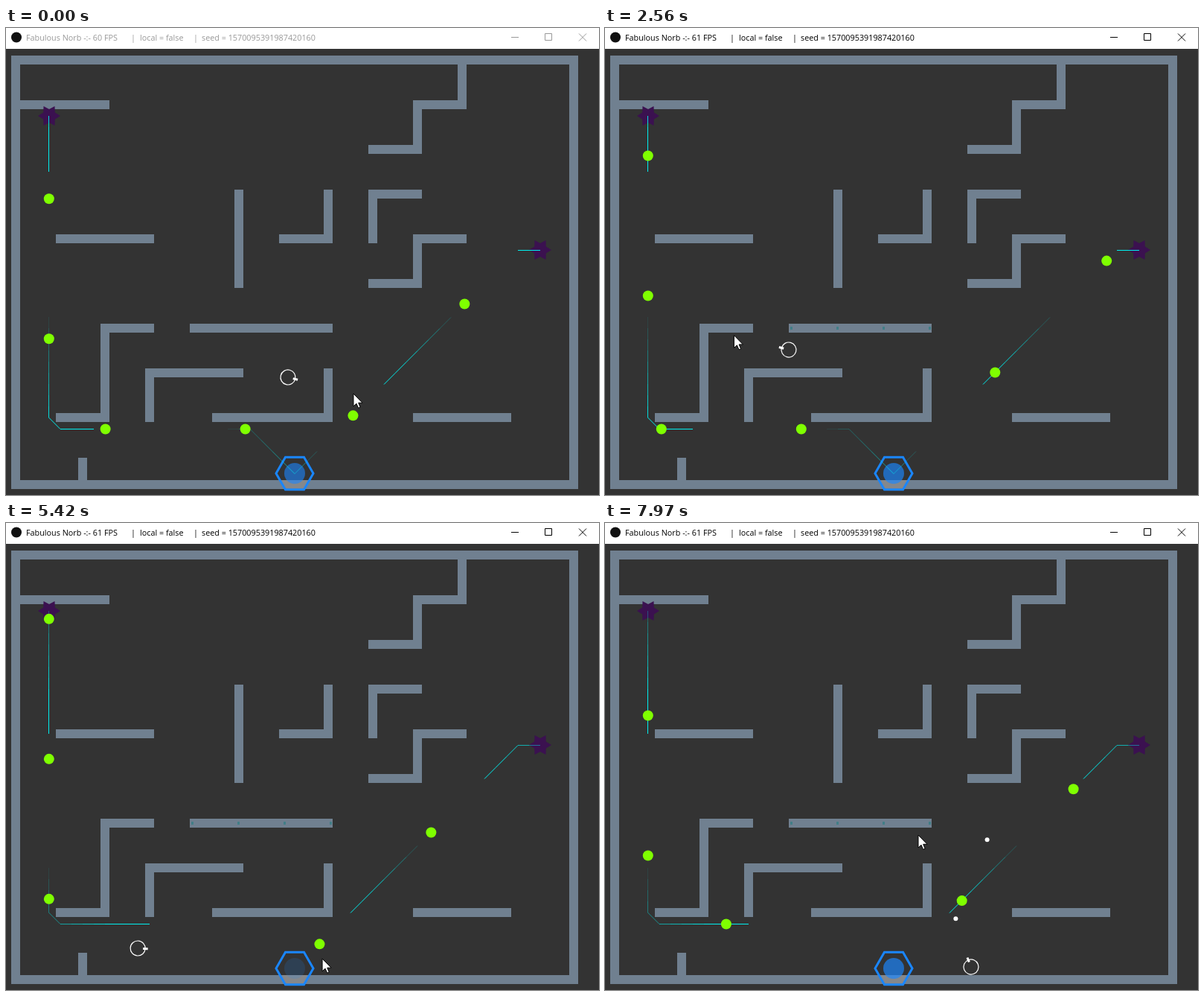
Write an HTML page with a canvas that moves like this. It is 797 px wide and 627 px high and loops after 8000 ms.

```html
<!DOCTYPE html>
<html lang="en">
<head>
<meta charset="utf-8">
<title>Maze defence</title>
<style>
  html, body { margin: 0; width: 100%; height: 100%; overflow: hidden; background: #333; }
  canvas { position: absolute; left: 0; top: 0; }
  #bar { position: absolute; left: 0; top: 0; width: 797px; height: 28px; background: #fff; color: #000;
    font: 10.8px/26px "Open Sans", "Noto Sans", sans-serif; }
  #bar.idle { color: #999; }
  #bar span { position: absolute; top: 0; white-space: pre; }
  #bar svg { position: absolute; left: 0; top: 0; }
</style>
</head>
<body>
<canvas id="stage" width="797" height="627"></canvas>
<div id="bar">
  <svg width="797" height="28" fill="none" stroke="currentColor">
    <circle cx="14" cy="12.5" r="7" fill="#111" stroke="none"/>
    <path d="M679 12.5h10M724.5 7.5h9v9h-9zM770 7.5l10 10m0-10l-10 10"/>
  </svg>
  <span style="left:27px">Fabulous Norb -:- <i id="fps" style="font-style:normal">60</i> FPS</span>
  <span style="left:168px">|</span>
  <span style="left:180px">local = false</span>
  <span style="left:252px">|</span>
  <span style="left:263px">seed = 1570095391987420160</span>
</div>
<script>
const LOOP = 8000;
const TAU = Math.PI * 2;
const ctx = document.getElementById('stage').getContext('2d');
const bar = document.getElementById('bar');
const fps = document.getElementById('fps');
const BLUE = '#1a86ff', CYAN = '#00f0f0';
const home = { x: 388, y: 598, reach: 14 };

// Wall centre lines, in grid cells
const walls = new Path2D(`M0 0h12.5v9.5h-12.5z M0 1h2 M10 0v1h-1v1h-1 M8 4v-1h1 M8 5h1v-1h1
  M1 4h2 M5 3v2 M6 4h1v-1 M3 6h-1v2h-1 M4 6h3 M3 8v-1h2 M4.5 8h2.5v-1 M9 8h2 M1.5 9v.5`);
const arrow = new Path2D('M0 0V17L4 13.3L6.6 19.3L9.2 18.2L6.7 12.3H12Z');

// Waypoints: [time, values...]
const playerKeys = [[0,379,469],[900,345,432],[1920,287,420],[3200,207,444],[3600,168,450],
  [4140,165,490],[5420,177,571],[7050,426,587],[7970,492,596]];
const cursorKeys = [[0,467,491],[1518,430,409],[1920,236,364],[3200,111,461],[4140,181,601],
  [5420,425,585],[7050,520,409],[7500,518,412],[7970,421,419]];
const glowKeys = [[0,.6],[3300,.68],[4100,1],[5200,1],[5400,.13],[6000,1],[7500,1],[7900,.68]];
const shots = [1518, 7500, 7800];

function sample(keys, t) {
  const i = keys.findIndex(k => k[0] > t);
  if (i < 0) return keys[keys.length - 1].slice(1);
  const a = keys[i - 1], b = keys[i], u = (t - a[0]) / (b[0] - a[0]);
  return a.slice(1).map((v, j) => v + (b[j + 1] - v) * u);
}

// Each leg: step x, step y, number of steps
function makePath(x, y, legs) {
  const steps = [];
  let length = 0;
  for (const [dx, dy, count] of legs)
    for (let i = 0; i < count; i++) {
      const size = Math.hypot(dx, dy);
      steps.push({ x, y, dx, dy, size, at: length });
      x += dx; y += dy; length += size;
    }
  return { steps, length };
}

const lanes = [
  { path: makePath(57.5, 118, [[0,15,27],[15.5,15.5,1],[15,0,17],[15,15,4]]),
    period: 25.5, first: 674, gap: 188, shot: { index: 2, at: 240 } },
  { path: makePath(718, 298.5, [[-15,0,2],[-15,15,20]]),
    period: 12, first: 342.5, gap: 212 }
];

function disc(x, y, r, color) {
  ctx.fillStyle = color;
  ctx.beginPath();
  ctx.arc(x, y, r, 0, TAU);
  ctx.fill();
}

function polygon(x, y, count, radius) {
  ctx.beginPath();
  for (let i = 0; i < count; i++) {
    const a = i * TAU / count, r = radius(i);
    ctx.lineTo(x + r * Math.cos(a), y + r * Math.sin(a));
  }
  ctx.closePath();
}

function drawWalls() {
  ctx.save();
  ctx.translate(13, 43);
  ctx.scale(60, 60);
  ctx.lineWidth = .2;
  ctx.lineCap = 'square';
  ctx.strokeStyle = '#708090';
  ctx.stroke(walls);
  ctx.restore();
}

function drawStains(t) {
  ctx.fillStyle = 'rgba(35,125,130,.6)';
  for (let i = 0; i < 4; i++)
    if (t > 1500 - 200 * i) ctx.fillRect(249 + 62 * i, 401, 3, 4);
}

function drawStar(x, y) {
  ctx.fillStyle = '#3b1150';
  polygon(x, y, 12, i => i % 2 ? 9 : 15);
  ctx.fill();
}

function drawHome(t) {
  polygon(home.x, home.y, 6, () => 25);
  ctx.save();
  ctx.clip();
  ctx.fillStyle = '#85888c';
  ctx.fillRect(360, 607, 56, 12);
  ctx.restore();
  ctx.globalAlpha = sample(glowKeys, t)[0];
  disc(home.x, home.y, home.reach, BLUE);
  ctx.globalAlpha = 1;
  polygon(home.x, home.y, 6, () => 25);
  ctx.strokeStyle = BLUE;
  ctx.lineWidth = 3;
  ctx.stroke();
}

// A bright head runs along the path; the half period behind it fades out
function drawTrail({ path, period }, phase) {
  ctx.lineWidth = 1;
  ctx.strokeStyle = CYAN;
  path.steps.forEach((s, i) => {
    const behind = (((phase * period - i - 1) % period) + period) % period;
    const alpha = 1 - 2 * Math.floor(behind) / period;
    if (alpha <= 0) return;
    ctx.globalAlpha = Math.min(1, alpha * 1.3);
    ctx.beginPath();
    ctx.moveTo(s.x, s.y);
    ctx.lineTo(s.x + s.dx, s.y + s.dy);
    ctx.stroke();
  });
  ctx.globalAlpha = 1;
}

function drawEnemies({ path, first, gap, shot }, travel) {
  for (let i = 0; i < 6; i++) {
    const d = first - i * gap + travel;
    if (d < 0 || d > path.length - home.reach) continue;
    if (shot && shot.index === i && travel > shot.at) continue;
    const s = path.steps.findLast(step => step.at <= d), u = (d - s.at) / s.size;
    disc(s.x + s.dx * u + .3, s.y + s.dy * u, 7, '#7fff00');
  }
}

const aimAt = t => {
  const [x, y] = sample(playerKeys, t), [cx, cy] = sample(cursorKeys, t);
  return { x, y, cx, cy, angle: Math.atan2(cy - y, cx - x) };
};

function drawBullets(t) {
  for (const fired of shots) {
    const age = t - fired;
    if (age < 0 || age > 600) continue;
    const { x, y, angle } = aimAt(fired), d = age * .372;
    disc(x + d * Math.cos(angle), y + d * Math.sin(angle), 3, '#fff');
  }
}

function drawPlayer({ x, y, angle }) {
  ctx.save();
  ctx.translate(x, y);
  ctx.rotate(angle);
  ctx.strokeStyle = ctx.fillStyle = '#fff';
  ctx.lineWidth = 1.2;
  ctx.beginPath();
  ctx.arc(0, 0, 10, 0, TAU);
  ctx.stroke();
  ctx.fillRect(7, -1.5, 6.5, 3);
  ctx.restore();
}

function drawCursor({ cx, cy }) {
  ctx.save();
  ctx.translate(cx, cy);
  ctx.fillStyle = '#fff';
  ctx.strokeStyle = '#000';
  ctx.lineWidth = 1;
  ctx.fill(arrow);
  ctx.stroke(arrow);
  ctx.restore();
}

function draw(t) {
  const travel = 1.2 + t * .05085;
  const aim = aimAt(t);
  bar.className = t < 400 ? 'idle' : '';
  // The reading is refreshed once a second
  fps.textContent = Math.floor((t + 400) / 1000) % 3 ? 61 : 60;

  ctx.fillStyle = '#333';
  ctx.fillRect(0, 0, 797, 627);
  drawWalls();
  drawStains(t);
  drawStar(58, 118);
  drawStar(718, 298);
  drawHome(t);
  for (const lane of lanes) drawTrail(lane, .234 + t / 1286);
  for (const lane of lanes) drawEnemies(lane, travel);
  drawBullets(t);
  drawPlayer(aim);
  drawCursor(aim);
}

const start = performance.now();
function tick() {
  draw((performance.now() - start) % LOOP);
  requestAnimationFrame(tick);
}
tick();
</script>
</body>
</html>
```
